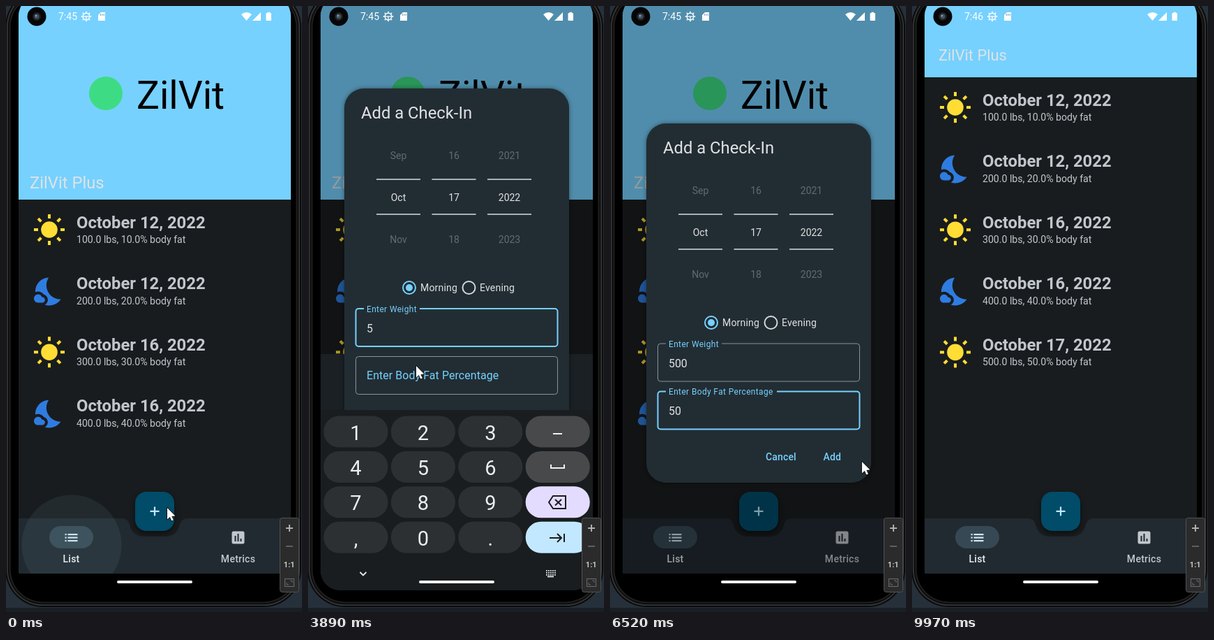
These frames come from a looping animation (424 px wide and 867 px high, 9.99 s). An HTML page with a canvas:

```html
<!DOCTYPE html>
<html lang="en">
<head>
<meta charset="utf-8">
<title>Check-in app</title>
<style>
html, body { margin: 0; width: 100%; height: 100%; overflow: hidden; background: #000; }
canvas { display: block; width: 424px; height: 867px; }
</style>
</head>
<body>
<canvas id="stage"></canvas>
<script>
const W = 424, H = 867, LOOP = 9990;
const canvas = document.getElementById('stage');
const dpr = window.devicePixelRatio || 1;
canvas.width = W * dpr;
canvas.height = H * dpr;
const c = canvas.getContext('2d');

const BLUE = '#76d1ff', GREY = '#c1c7cd', BG = '#191c1e', PANEL = '#222d33', YELLOW = '#ffdd35', NIGHT = '#2f7ce0';

const bursts = [[120, 390, 3], [660, 1620, 8], [1770, 2730, 8], [2850, 3360, 5], [3890, 4260, 3],
  [4530, 4800, 3], [5200, 6130, 8], [6250, 7210, 8], [7360, 8380, 9], [8500, 9010, 5], [9290, 9530, 3]];
const ticks = [0, ...bursts.flatMap(([a, b, n]) =>
  Array.from({ length: n }, (_, i) => a + (b - a) * i / (n - 1)))];

// Pointer path: time, x, y.
const pointer = [[0, 231, 718], [390, 217, 711], [1071, 217, 711], [1620, 212, 372], [1770, 212, 368],
  [2181, 206, 308], [2600, 142, 543], [2730, 150, 528], [2850, 155, 515], [5200, 155, 515],
  [5466, 213, 838], [5865, 79, 812], [6130, 79, 812], [6524, 361, 652], [6800, 318, 645],
  [7360, 318, 645], [7742, 315, 460], [7870, 315, 456], [8252, 315, 348], [8380, 314, 290],
  [8500, 330, 320], [8883, 286, 689], [9289, 344, 846], [9410, 277, 823]];

const clamp = v => Math.min(1, Math.max(0, v));
const ramp = (t, a, b) => clamp((t - a) / (b - a));
const lerp = (a, b, p) => a + (b - a) * p;
const easeOut = p => 1 - (1 - p) ** 2;

function along(track, t) {
  const i = track.findIndex(k => k[0] > t);
  if (i < 0) return track[track.length - 1].slice(1);
  const [a, b] = [track[i - 1], track[i]];
  const p = ramp(t, a[0], b[0]);
  return [lerp(a[1], b[1], p), lerp(a[2], b[2], p)];
}

function group(draw, alpha = 1, dx = 0, dy = 0) {
  c.save();
  c.globalAlpha *= alpha;
  c.translate(dx, dy);
  draw();
  c.restore();
}
function text(s, x, y, size, color, { weight = 400, align = 'left', spacing = 0 } = {}) {
  c.font = `${weight} ${size}px Roboto, sans-serif`;
  c.letterSpacing = spacing + 'px';
  c.textAlign = align;
  c.fillStyle = color;
  c.fillText(s, x, y);
}
function rect(x, y, w, h, color) {
  c.fillStyle = color;
  c.fillRect(x, y, w, h);
}
function roundPath(x, y, w, h, r) {
  c.beginPath();
  c.roundRect(x, y, w, h, r);
}
function box(x, y, w, h, r, color) {
  roundPath(x, y, w, h, r);
  c.fillStyle = color;
  c.fill();
}
function disc(x, y, r, color) {
  c.beginPath();
  c.arc(x, y, r, 0, Math.PI * 2);
  c.fillStyle = color;
  c.fill();
}
function ring(x, y, r, width, color) {
  c.beginPath();
  c.arc(x, y, r, 0, Math.PI * 2);
  c.lineWidth = width;
  c.strokeStyle = color;
  c.stroke();
}
function line(points, width, color, close) {
  c.beginPath();
  points.forEach(([x, y]) => c.lineTo(x, y));
  if (close) c.closePath();
  c.lineWidth = width;
  c.strokeStyle = color;
  c.stroke();
}
function shape(points, color) {
  c.beginPath();
  points.forEach(([x, y]) => c.lineTo(x, y));
  c.fillStyle = color;
  c.fill();
}

function sun(x, y) {
  disc(x, y, 11.8, YELLOW);
  for (let i = 0; i < 8; i++) {
    c.save();
    c.translate(x, y);
    c.rotate(i * Math.PI / 4);
    rect(-2, i % 2 ? -22.5 : -22, 4, 6, YELLOW);
    c.restore();
  }
}
const moonPath = new Path2D('M11.1 12.08c-2.33-4.51-.5-8.48.53-10.07C6.27 2.2 1.98 6.59 1.98 12c0 .14.02.28.02.42.62-.27 1.29-.42 2-.42 1.66 0 3.18.83 4.1 2.15 1.67.48 2.9 2.02 2.9 3.85 0 1.52-.87 2.83-2.12 3.51.98.32 2.03.5 3.11.5 3.5 0 6.58-1.8 8.37-4.52-2.36.23-6.98-.97-9.26-5.41zM7 16h-.18C6.4 14.84 5.3 14 4 14c-1.66 0-3 1.34-3 3s1.34 3 3 3h3c1.1 0 2-.9 2-2s-.9-2-2-2z');
function moon(x, y) {
  c.save();
  c.translate(x - 24, y - 23);
  c.scale(1.99, 1.99);
  c.fillStyle = NIGHT;
  c.fill(moonPath);
  c.restore();
}

function drawPhone() {
  rect(0, 0, W, H, '#26303b');
  rect(0, 861, W, 6, '#1a1f26');
  const layers = ['#0a0a0a', '#343434', '#0d0d0d', '#1f1f1f', '#000'];
  layers.forEach((color, i) => {
    const d = i * 1.9;
    box(-1 + d, -24 + d, 424 - 2 * d, 884 - 2 * d, 54 - d, color);
  });
}

function drawHeader(scroll, scrim) {
  const h = 277 - scroll;
  c.save();
  c.beginPath();
  c.rect(18, 0, 390, h);
  c.clip();
  rect(18, 0, 390, h, BLUE);
  group(() => {
    disc(143, 125, 24, '#3ddc84');
    text('ZilVit', 187, 147, 55, '#000');
  }, 1 - scrim, 0, -scroll * 0.464);
  const p = ramp(scroll, 112, 175);
  text('ZilVit Plus', lerp(34, 38, p), 261 - scroll - 8 * p, lerp(23.8, 21.8, p), '#dfe2e5');
  c.restore();
}

function drawList(scroll, count) {
  for (let i = 0; i < count; i++) {
    const y = 320 + 87.6 * i - scroll;
    (i % 2 ? moon : sun)(62, y);
    text(`October ${[12, 12, 16, 16, 17][i]}, 2022`, 101, y - 2.5, 23.8, GREY, { weight: 700 });
    text(`${i + 1}00.0 lbs, ${i + 1}0.0% body fat`, 101, y + 19, 14.1, GREY);
  }
}

function drawNav(press) {
  c.beginPath();
  c.moveTo(18, 733);
  c.lineTo(164, 733);
  c.bezierCurveTo(172, 733, 175, 736, 177, 742);
  c.bezierCurveTo(180, 754, 188, 759, 198, 759);
  c.lineTo(228, 759);
  c.bezierCurveTo(238, 759, 246, 754, 249, 742);
  c.bezierCurveTo(251, 736, 254, 733, 262, 733);
  c.lineTo(408, 733);
  c.lineTo(408, 812);
  c.lineTo(18, 812);
  c.fillStyle = '#212a31';
  c.fill();

  box(62, 744, 63, 32, 16, '#364853');
  for (let y = 755; y < 767; y += 4.5) {
    rect(84.5, y, 2.2, 2.2, '#d2e5f5');
    rect(88.5, y, 14, 2.2, '#d2e5f5');
  }
  text('List', 93.5, 796, 14, '#eceef0', { weight: 500, align: 'center', spacing: 0.25 });
  box(323.5, 751.5, 18, 18, 2.5, GREY);
  rect(327.5, 758, 2, 8, '#212a31');
  rect(331.5, 755, 2, 11, '#212a31');
  rect(335.5, 762, 2, 4, '#212a31');
  text('Metrics', 332.5, 796, 14, GREY, { weight: 500, align: 'center', spacing: 0.25 });

  c.save();
  c.shadowColor = 'rgba(0,0,0,.5)';
  c.shadowBlur = 7 * dpr;
  c.shadowOffsetY = 3 * dpr;
  box(185, 695, 56, 56, 16, '#004c69');
  c.restore();
  rect(206.5, 721.8, 13, 2.2, '#c0e8ff');
  rect(211.9, 716.4, 2.2, 13, '#c0e8ff');
  if (press) box(185, 695, 56, 56, 16, `rgba(192,232,255,${0.2 * press})`);
}

function drawPicker(x, values, offset) {
  c.save();
  c.beginPath();
  c.rect(x - 32, 244, 64, 161);
  c.clip();
  values.forEach((value, i) => {
    const row = i - 1 - offset;
    const alpha = lerp(1, 0.34, clamp(Math.abs(row)));
    group(() => text(value, x, 329 + 60 * row, 14, '#e1e2e4', { align: 'center' }), alpha);
  });
  c.restore();
  rect(x - 31.5, 297, 63, 2, '#a9b1b6');
  rect(x - 31.5, 347, 63, 2, '#a9b1b6');
}

function drawField(y, label, gap, float, focused, value) {
  const width = focused ? 2 : 1;
  roundPath(68.5, y, 289, 54, 4);
  c.lineWidth = width;
  c.strokeStyle = focused ? BLUE : '#8a9297';
  c.stroke();
  if (float) rect(80, y - 3, gap, 6, PANEL);
  text(label, 84, lerp(y + 32.5, y + 4.5, float), lerp(15.9, 11.9, float), BLUE, { spacing: lerp(0.1, 0.4, float) });
  text(value, 84, y + 33.5, 15.9, '#e1e2e4');
}

function drawDialog(t) {
  c.save();
  c.shadowColor = 'rgba(0,0,0,.4)';
  c.shadowBlur = 6 * dpr;
  box(52, 168, 322, 514, 28, PANEL);
  c.restore();
  text('Add a Check-In', 76, 211, 23.8, '#e1e2e4');
  drawPicker(129.5, ['Sep', 'Oct', 'Nov'], 0);
  drawPicker(209, [15, 16, 17, 18], easeOut(ramp(t, 1770, 2320)));
  drawPicker(288.5, [2021, 2022, 2023], 0);

  ring(145, 453, 9, 2, BLUE);
  disc(145, 453, 5, BLUE);
  ring(230.5, 453, 9, 2, '#d5d8da');
  text('Morning', 161, 458, 14, '#e1e2e4', { spacing: 0.2 });
  text('Evening', 246, 458, 14, '#e1e2e4', { spacing: 0.2 });

  const second = t >= 4530;
  const weight = '500'.slice(0, [3890, 4020, 4255].filter(k => t >= k).length);
  const fat = '50'.slice(0, [5200, 5330].filter(k => t >= k).length);
  drawField(483, 'Enter Weight', 80, ramp(t, 2800, 3105), t >= 2850 && !second, weight);
  drawField(551.5, 'Enter Body Fat Percentage', 159, ramp(t, 4400, 4790), second, fat);
  if (t >= 2900 && t < 3300) rect(84, 500, 2, 20, BLUE);

  const press = ramp(t, 6780, 6940) * (1 - ramp(t, 7100, 7490));
  if (press) box(294, 625, 49, 40, 20, `rgba(118,209,255,${0.14 * press})`);
  text('Cancel', 223, 650, 14, BLUE, { weight: 500, spacing: 0.15 });
  text('Add', 305.5, 650, 14, BLUE, { weight: 500, spacing: 0.15 });
}

function drawKeyboard(done) {
  rect(18, 578, 390, 258, '#191d20');
  ['123', '456', '789', ',0.'].forEach((keys, row) => {
    const y = 586.5 + row * 50.4;
    [...keys].forEach((key, col) => {
      const x = 22.5 + col * 96.4;
      box(x, y, 92, 45, 22, '#2d3033');
      text(key, x + 46, y + 34, 29, '#eceef0', { align: 'center' });
    });
    box(311.7, y, 92, 45, 22, ['#48494b', '#48494b', '#e4dcff', '#c2e8ff'][row]);
  });
  rect(351, 611, 13, 2, '#f0f0f0');
  line([[348, 656], [348, 661], [367, 661], [367, 656]], 2, '#f0f0f0');
  line([[345, 710], [351, 701], [369, 701], [369, 719], [351, 719]], 2, '#1c1d20', true);
  line([[354, 706], [363, 714.5]], 2, '#1c1d20');
  line([[363, 706], [354, 714.5]], 2, '#1c1d20');
  if (done) {
    line([[349, 760], [355, 766], [366, 755]], 2.2, '#1c1d20');
  } else {
    line([[346, 761], [362, 761]], 2, '#1c1d20');
    line([[357, 755], [363, 761], [357, 767]], 2, '#1c1d20');
    line([[367, 755], [367, 767]], 2, '#1c1d20');
  }
  line([[74.5, 810], [79, 814.5], [83.5, 810]], 1.8, '#e8e8e8');
  for (let i = 0; i < 15; i++) rect(341 + i % 5 * 3, 807 + Math.floor(i / 5) * 3, 1.8, 1.8, '#e8e8e8');
  rect(343, 815.5, 9, 1.8, '#e8e8e8');
}

function drawStatus(t) {
  disc(44, 15, 13.5, '#050607');
  disc(44, 15, 6, '#1b2127');
  disc(44, 15, 3.5, '#46505a');
  disc(43, 14, 1.4, '#8995a0');
  text(t < 6920 ? '7:45' : '7:46', 75, 20, 14, '#fff');
  ring(115, 15, 4.8, 1.5, '#fff');
  for (let i = 0; i < 8; i++) {
    const a = i * Math.PI / 4;
    disc(115 + 6.3 * Math.cos(a), 15 + 6.3 * Math.sin(a), 1, '#fff');
  }
  rect(111, 14.4, 8, 1.2, '#fff');
  rect(114.4, 15, 1.2, 4, '#fff');
  shape([[136, 9], [142, 9], [142, 21], [132, 21], [132, 13]], '#fff');
  [135, 137.4, 139.8].forEach(x => rect(x, 11, 1.1, 3, '#8fa9b8'));
  c.beginPath();
  c.moveTo(344.5, 21);
  c.lineTo(337, 12);
  c.quadraticCurveTo(344.5, 6, 352, 12);
  c.fillStyle = '#fff';
  c.fill();
  shape([[365, 9], [365, 21], [353, 21]], '#fff');
  box(372.5, 10, 7.5, 11, 1, '#fff');
  rect(374.5, 8.8, 3.5, 2, '#fff');
}

function drawToolbar() {
  box(392.5, 732.5, 27, 106, 3, '#2b2b2c');
  c.lineWidth = 1;
  c.strokeStyle = '#505152';
  c.stroke();
  rect(401, 746.2, 10, 1.8, '#b8babc');
  rect(405.1, 742, 1.8, 10, '#b8babc');
  rect(401, 772.2, 10, 1.6, '#696b6d');
  text('1:1', 405.7, 803, 11, '#c4c6c8', { weight: 700, align: 'center' });
  c.strokeStyle = '#696b6d';
  c.strokeRect(399.5, 819.5, 13, 11);
  line([[402, 825], [402, 828], [405, 828]], 1, '#696b6d');
  line([[407, 822], [410, 822], [410, 825]], 1, '#696b6d');
}

function drawPointer(t) {
  if (t >= 9000 && t < 9280 || t >= 9520) return;
  const [x, y] = along(pointer, t);
  group(() => {
    const arrow = [[0, 0], [0, 16.5], [3.8, 13], [6.3, 18.6], [8.9, 17.4], [6.4, 12], [11.4, 11.6]];
    c.lineJoin = 'round';
    line(arrow, 1.8, '#111', true);
    shape(arrow, '#fff');
  }, 1, x, y);
}

function draw(t) {
  const shown = easeOut(ramp(t, 560, 1031)) * (t < 660 ? 0 : 1) * (1 - ramp(t, 7240, 7490));
  const keyboard = easeOut(ramp(t, 2980, 3360)) * (1 - ramp(t, 5990, 6390));
  const scroll = 112 * ramp(t, 7870, 8252) + 63 * ramp(t, 8252, 8380);
  const press = ramp(t, 500, 797) * (1 - ramp(t, 934, 1620)) * (t < 660 ? 0 : 1);

  c.setTransform(dpr, 0, 0, dpr, 0, 0);
  drawPhone();
  c.save();
  roundPath(18, -14, 390, 850, 28);
  c.clip();
  rect(18, 0, 390, 836, '#000');
  rect(18, 0, 390, 812, BG);
  drawList(scroll, t < 7360 ? 4 : 5);
  drawHeader(scroll, ramp(t, 8260, 8760));
  drawNav(press);
  if (t < 790) {
    c.save();
    c.beginPath();
    c.rect(18, 690, 390, 122);
    c.clip();
    disc(94, 771, 71.5, `rgba(150,205,225,${t < 660 ? 0.075 : 0.04})`);
    c.restore();
  }
  rect(18, 0, 390, 836, `rgba(0,0,0,${0.325 * shown})`);
  const slide = (1 - keyboard) * 338;
  if (keyboard) rect(18, 498 + slide, 390, 338, '#1a2024');
  if (shown) {
    c.save();
    c.beginPath();
    c.rect(18, 0, 390, lerp(836, 578, keyboard));
    c.clip();
    group(() => drawDialog(t), shown, 0, -50 * keyboard);
    c.restore();
  }
  if (keyboard) group(() => drawKeyboard(t >= 4530), 1, 0, slide);
  drawStatus(t);
  box(159, 822, 108, 4, 2, '#f4f4f4');
  c.restore();
  drawToolbar();
  drawPointer(t);
}

const start = performance.now();
function frame() {
  const t = (performance.now() - start) % LOOP;
  draw(ticks.filter(k => k <= t + 10).pop());
  requestAnimationFrame(frame);
}
frame();
</script>
</body>
</html>
```
